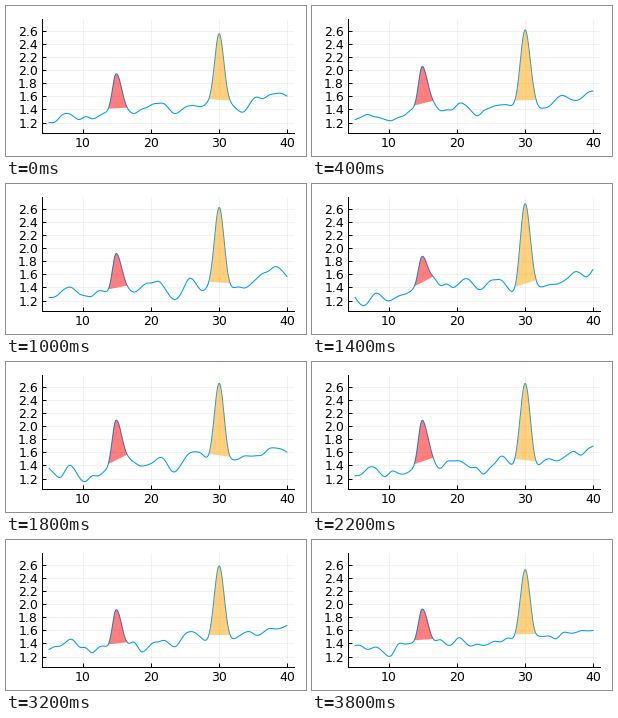
Write a matplotlib script that moves like this. It is 300 px wide and 150 px high and loops after 4 s.

```python
import numpy as np
import matplotlib.pyplot as plt
from matplotlib.animation import FuncAnimation
from matplotlib.patches import Polygon

W, H, DPI = 300, 150, 100
FRAMES, INTERVAL = 20, 200
PX = 72 / DPI  # one pixel in points

X = np.linspace(5, 40, 701)
KNOTS = np.linspace(5, 40, 40)

# Mean level under the peaks
DRIFT_X = [5, 6.5, 8, 9.5, 12, 13.6, 16.6, 18.3, 21.5, 23.4, 25.2, 26.7,
           28.4, 31.8, 33.5, 40]
DRIFT_Y = [1.28, 1.27, 1.40, 1.26, 1.33, 1.34, 1.43, 1.40, 1.45, 1.31, 1.46,
           1.48, 1.39, 1.42, 1.49, 1.63]


def spline(xk, yk, x):
    """Natural cubic spline through (xk, yk)."""
    xk, yk = np.asarray(xk, float), np.asarray(yk, float)
    h, n = np.diff(xk), len(xk)
    a, b = np.eye(n), np.zeros(n)
    slope = np.diff(yk) / h
    for i in range(1, n - 1):
        a[i, i - 1:i + 2] = h[i - 1], 2 * (h[i - 1] + h[i]), h[i]
        b[i] = 6 * (slope[i] - slope[i - 1])
    m = np.linalg.solve(a, b)
    j = np.clip(np.searchsorted(xk, x) - 1, 0, n - 2)
    u, v, d = xk[j + 1] - x, x - xk[j], h[j]
    return ((m[j] * u**3 + m[j + 1] * v**3) / (6 * d)
            + (yk[j] / d - m[j] * d / 6) * u
            + (yk[j + 1] / d - m[j + 1] * d / 6) * v)


def bell(center, left, right):
    """Gaussian with its own width on each side."""
    sigma = np.where(X < center, left, right)
    return np.exp(-0.5 * ((X - center) / sigma) ** 2)


DRIFT = spline(DRIFT_X, DRIFT_Y, X)
LOW, HIGH = bell(14.85, 0.54, 0.77), bell(30.03, 0.71, 0.72)
SPANS = ((13.7, 16.5), (28.5, 31.7))
COLORS = ("red", "orange")


def signal(i):
    rng = np.random.default_rng(40 + i)
    wiggle = np.convolve(rng.normal(0, 0.047, KNOTS.size + 2),
                         [0.3, 1, 0.3], "valid")
    y = DRIFT + spline(KNOTS, wiggle, X) * (1 - LOW) * (1 - HIGH)
    low_top = 1.97 + rng.uniform(-0.1, 0.12)
    high_top = (2.61 + 0.06 * np.cos(2 * np.pi * (i - 8) / FRAMES)
                + rng.uniform(-0.03, 0.03))
    for top, shape in ((low_top, LOW), (high_top, HIGH)):
        y = y + (top - DRIFT[shape.argmax()]) * shape
    return y


fig = plt.figure(figsize=(W / DPI, H / DPI), dpi=DPI, facecolor="white")
ax = fig.add_axes([36 / W, 23.4 / H, 252 / W, 114 / H])
ax.set(xlim=(3.95, 41.05), ylim=(1.048, 2.783),
       xticks=range(10, 41, 10), yticks=np.arange(1.2, 2.7, 0.2))
ax.yaxis.set_major_formatter("{x:.1f}")
ax.set_axisbelow(True)
ax.grid(color="black", alpha=0.1, lw=0.5 * PX)
ax.spines[["top", "right"]].set_visible(False)
ax.spines[["left", "bottom"]].set_linewidth(PX)
ax.tick_params(direction="in", length=4 * PX, width=PX, pad=4 * PX,
               labelsize=9, labelfontfamily="DejaVu Sans")

line, = ax.plot([], [], color="#009AFA", lw=1.05 * PX, zorder=2.5)
fills = [ax.add_patch(Polygon([(5, 1.4)] * 3, fc=c, ec="none", alpha=0.5,
                              zorder=3)) for c in COLORS]


def update(i):
    y = signal(i)
    line.set_data(X, y)
    for patch, (lo, hi) in zip(fills, SPANS):
        inside = (X >= lo) & (X <= hi)
        patch.set_xy(np.column_stack([X[inside], y[inside]]))
    return [line, *fills]


anim = FuncAnimation(fig, update, frames=FRAMES, interval=INTERVAL,
                     repeat=True, repeat_delay=0)
plt.show()
```
